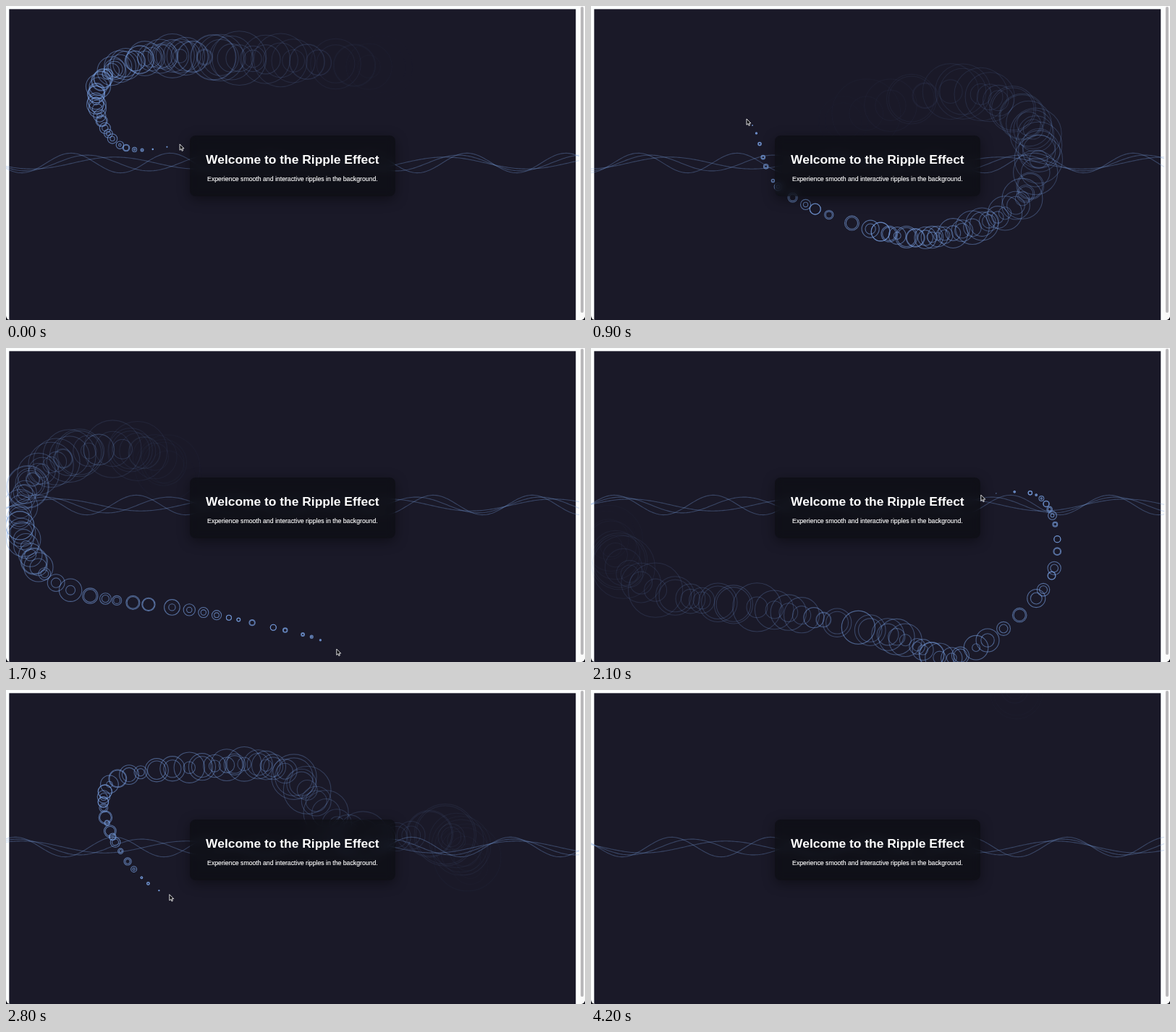
An HTML page with a canvas for the animation above (4.3 s loop, 800x434 px).

```html
<!DOCTYPE html>
<html lang="en">
<head>
<meta charset="utf-8">
<title>Ripple Effect</title>
<style>
  html, body { margin: 0; width: 100%; height: 100%; overflow: hidden; background: #15151c; }
  .stage {
    position: relative; width: 800px; height: 434px; overflow: hidden;
    background: #fbfdfd; border-radius: 0 0 6px 6px;
    font-family: "Liberation Sans", Arial, sans-serif;
  }
  canvas { position: absolute; left: 0; top: 0; }
  .bar { position: absolute; left: 792px; top: 0; width: 8px; height: 434px; background: #fafafa; }
  .bar::after {
    content: ""; position: absolute; left: 1.8px; top: 1px; width: 4.4px; height: 423px;
    border-radius: 3px; background: #b9b8ba;
  }
  .panel {
    position: absolute; left: 254.2px; top: 179.4px; width: 283.4px; height: 84px;
    box-sizing: border-box; padding-top: 10.9px; border-radius: 8px;
    background: rgba(8, 10, 12, .55); backdrop-filter: blur(5.4px);
    box-shadow: 0 4.4px 17.4px rgba(0, 0, 0, .4);
    color: #fff; text-align: center; white-space: nowrap;
  }
  h1 { margin: 11.67px 0; font-size: 17.41px; line-height: 20.1px; font-weight: bold; }
  p { margin: 0; font-size: 8.71px; line-height: 10px; -webkit-text-stroke: .15px #fff; }
  .cursor { position: absolute; left: 0; top: 0; width: 8px; height: 12px; overflow: visible; }
</style>
</head>
<body>
<div class="stage">
  <canvas width="792" height="434"></canvas>
  <div class="panel">
    <h1>Welcome to the Ripple Effect</h1>
    <p>Experience smooth and interactive ripples in the background.</p>
  </div>
  <div class="bar"></div>
  <svg class="cursor" viewBox="0 0 8 12">
    <path d="M0 0V8.3L1.9 6.5L3.1 9.4L4.5 8.8L3.3 6H5.9Z" fill="#08080c" stroke="#fff" stroke-width=".85" stroke-linejoin="round"/>
  </svg>
</div>
<script>
const LOOP = 4300, STEP = 100, LIFE = 830, LAG = 10;
const ENTER = -850, EXIT = 3400, SPACING = 125;
const INK = '122,162,228';
const ctx = document.querySelector('canvas').getContext('2d');
const cursor = document.querySelector('.cursor');

// Pointer path: one point per SPACING ms, joined by a smooth curve
const path = [
  [530, 86], [400, 76], [285, 71], [200, 71], [138, 96], [126, 141], [166, 196],
  [270, 184], [500, 118], [612, 172], [597, 265], [508, 312], [412, 315], [263, 254],
  [215, 156], [115, 142], [36, 183], [22, 258], [85, 333], [265, 364], [418, 398],
  [508, 426], [634, 320], [620, 206], [480, 200], [385, 112], [275, 106], [148, 126],
  [145, 198], [211, 277], [300, 272], [480, 190], [590, 108], [605, 48], [585, -2]
];
const knot = i => path[Math.max(0, Math.min(path.length - 1, i))];

// Catmull-Rom interpolation
function pointAt(t) {
  const s = (Math.min(t, EXIT) - ENTER) / SPACING, i = Math.floor(s), u = s - i;
  return [0, 1].map(n => {
    const [a, b, c, d] = [-1, 0, 1, 2].map(k => knot(i + k)[n]);
    return b + u / 2 * (c - a + u * (2 * a - 5 * b + 4 * c - d + u * (3 * (b - c) + d - a)));
  });
}

function seeded(s) {
  return () => {
    s = s + 0x6D2B79F5 | 0;
    let r = Math.imul(s ^ s >>> 15, 1 | s);
    r = r + Math.imul(r ^ r >>> 7, 61 | r) ^ r;
    return ((r ^ r >>> 14) >>> 0) / 4294967296;
  };
}

// Each pointer move leaves two ripples that grow at their own speed
const random = seeded(11);
const ripples = [];
for (let t = ENTER; t <= EXIT; t += 10 + random() * 14) {
  const [x, y] = pointAt(t);
  for (let n = 0; n < 2; n++) ripples.push({ x, y, born: t + LAG, speed: .016 + .044 * random() });
}

function drawWaves(t) {
  const phase = 4.13 - t * .00126;
  ctx.strokeStyle = `rgba(${INK},.32)`;
  for (let i = 0; i < 3; i++) {
    const amp = 13.6 - 2.7 * i, k = .04594 - .00919 * i;
    ctx.beginPath();
    for (let x = 0; x <= 792; x += 2) ctx.lineTo(x, 217 - amp * Math.cos(k * x - phase));
    ctx.stroke();
  }
}

function drawRipples(t) {
  for (const r of ripples) {
    const age = t - r.born;
    if (age < 0 || age >= LIFE) continue;
    ctx.strokeStyle = `rgba(${INK},${.8 * (1 - age / LIFE)})`;
    ctx.beginPath();
    ctx.arc(r.x, r.y, age * r.speed, 0, 2 * Math.PI);
    ctx.stroke();
  }
}

function render(t) {
  ctx.clearRect(0, 0, 792, 434);
  ctx.fillStyle = '#1a1928';
  ctx.fillRect(4.35, 4.35, 782.9, 430);
  ctx.lineWidth = 1.09;
  drawWaves(t);
  drawRipples(t);
  const [x, y] = pointAt(t);
  cursor.style.transform = `translate(${x}px,${y}px)`;
  cursor.style.visibility = t > EXIT ? 'hidden' : 'visible';
}

const start = performance.now();
let shown = -1;
function tick() {
  const t = Math.floor((performance.now() - start) % LOOP / STEP) * STEP;
  if (t !== shown) render(shown = t);
  requestAnimationFrame(tick);
}
tick();
</script>
</body>
</html>
```
